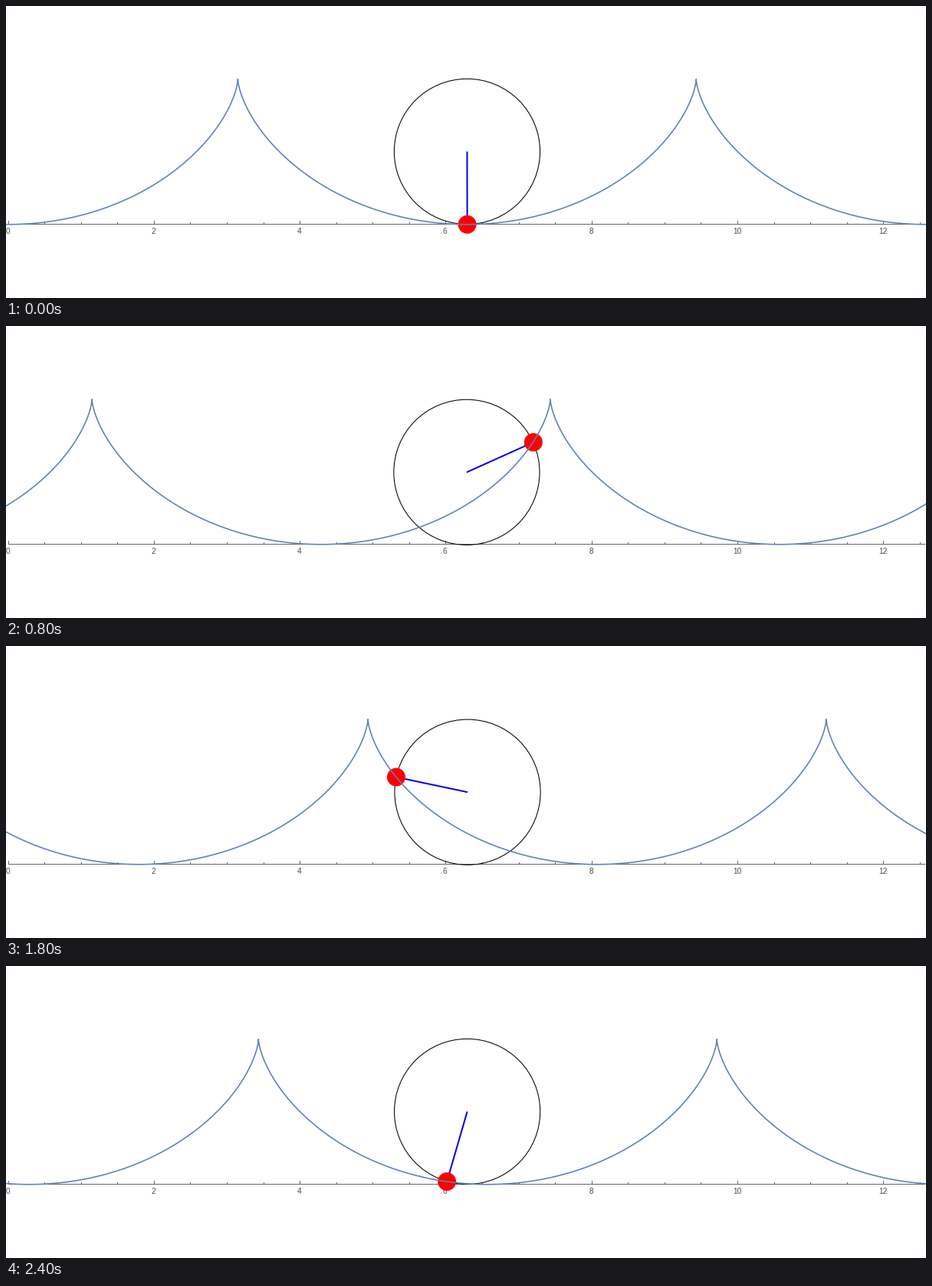
Write a matplotlib script that moves like this. It is 1200 px wide and 382 px high and loops after 2500 ms.

```python
import numpy as np
import matplotlib.pyplot as plt
from matplotlib.animation import FuncAnimation
from matplotlib.patches import Circle

W, H, DPI = 1200, 382, 100
FRAMES, STEP = 25, 0.25          # frames per loop, radians per frame
X0, UNIT = 3.5, 95.15            # pixel position of zero, pixels per unit
AXIS_Y, TOP = 285.5, 95.8
PX = 72 / DPI                    # points per pixel

plt.rcParams["font.family"] = "Liberation Sans"
plt.rcParams["path.simplify"] = False
fig = plt.figure(figsize=(W / DPI, H / DPI), dpi=DPI, facecolor="white")
ax = fig.add_axes([0, 0, 1, 1])
ax.set_xlim(0, W)
ax.set_ylim(H, 0)
ax.axis("off")


def line(xs, ys, color, width, z, **kw):
    return ax.plot(xs, ys, color=color, lw=width * PX, zorder=z,
                   solid_capstyle="butt", **kw)[0]


def draw_axis():
    gray = "#666666"
    line([3, 1199], [AXIS_Y, AXIS_Y], gray, 1, 1, snap=False)
    for i in range(26):
        x = int(3 + UNIT * i / 2) + 0.5
        major = i % 4 == 0
        line([x, x], [AXIS_Y, 281 if major else 283], gray, 1, 1, snap=False)
        if major:
            ax.text(x - 0.9, 298.3, str(i // 2), fontsize=10 * PX,
                    color="#4a4a4a", ha="center", va="baseline", zorder=1)


draw_axis()
wheel = ax.add_patch(Circle((0, 0), 95.1, fill=False, ec="black",
                            lw=1.05 * PX, zorder=2))
spoke = line([], [], "#0000f0", 2, 3)
dot = ax.add_patch(Circle((0, 0), 12, fc="red", ec="none", zorder=4))
curve = line([], [], "#5e81b5", 1.6, 5, solid_joinstyle="round")

# Inverted cycloid, cusps at multiples of 2 pi
t = np.linspace(-2 * np.pi, 6 * np.pi, 1601)
cycloid_x = UNIT * (t - np.sin(t))
cycloid_y = TOP + UNIT * (1 - np.cos(t)) * 0.998


def update(i):
    a = STEP * i
    s, c = np.sin(a), np.cos(a)
    hub = (601.45 - 0.6 * s, 190.4 + 0.65 * (1 - c))
    tip = (601.6 + 94.8 * s, 191.4 + 94.4 * c)
    wheel.center = hub
    dot.center = tip
    spoke.set_data([hub[0], tip[0]], [hub[1], tip[1]])
    curve.set_data(X0 + UNIT * (np.pi - a) + cycloid_x, cycloid_y)
    return wheel, spoke, dot, curve


anim = FuncAnimation(fig, update, frames=FRAMES, interval=100,
                     init_func=lambda: update(0), repeat=True, repeat_delay=0)
plt.show()
```
